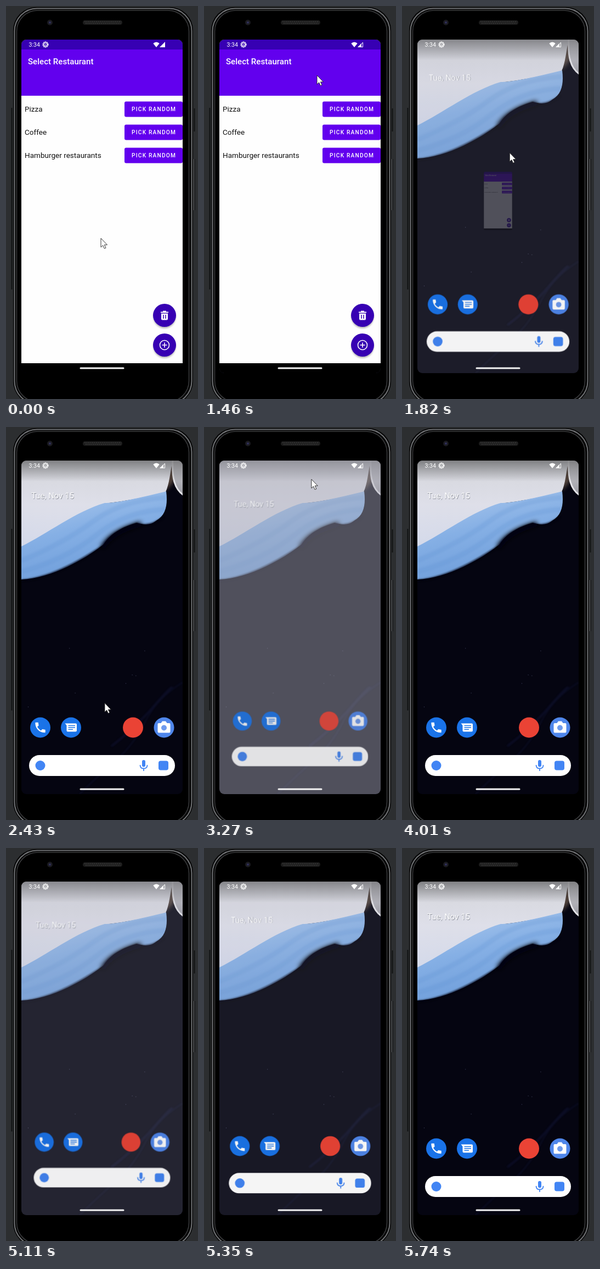
Animation, 350 px wide and 714 px high, one loop 8 s. Source, as an HTML page:

```html
<!DOCTYPE html>
<html lang="en">
<head>
<meta charset="utf-8">
<title>Phone home gesture</title>
<style>
  html, body { margin: 0; width: 100%; height: 100%; overflow: hidden; background: #2c2e30; }
  svg { display: block; width: 350px; height: 714px; font-family: Roboto, sans-serif; }
</style>
</head>
<body>
<svg viewBox="0 0 350 714" xmlns="http://www.w3.org/2000/svg">
  <defs>
    <clipPath id="screen"><rect x="28" y="61" width="294" height="606" rx="9"/></clipPath>
    <clipPath id="blue"><path d="M28 217C75 194 128 153 180 138C205 138 250 127 292 117C295 140 292 160 274 170C262 180 250 177 238 174C212 182 192 192 178 213C150 236 85 275 28 277Z"/></clipPath>
    <linearGradient id="sky" x2="0" y2="1"><stop stop-color="#d4d5da"/><stop offset=".5" stop-color="#dedfe9"/><stop offset="1" stop-color="#d3d9ea"/></linearGradient>
    <linearGradient id="wave" x2=".35" y2="1"><stop stop-color="#b3cdee"/><stop offset=".5" stop-color="#86b0e5"/><stop offset="1" stop-color="#6c9cda"/></linearGradient>
    <linearGradient id="ring" x2="0" y2="1"><stop stop-color="#d6d6da"/><stop offset="1" stop-color="#9a9aa2"/></linearGradient>
    <linearGradient id="shade" x2="0" y2="1"><stop stop-color="#000" stop-opacity=".4"/><stop offset="1" stop-color="#000" stop-opacity="0"/></linearGradient>
    <filter id="soft" x="-30%" y="-30%" width="160%" height="160%"><feGaussianBlur stdDeviation="4"/></filter>
    <filter id="fuzz" x="-30%" y="-30%" width="160%" height="160%"><feGaussianBlur stdDeviation="1.5"/></filter>
  </defs>

  <!-- phone body -->
  <rect width="350" height="714" fill="#2c2e30"/>
  <path d="M10.500 185V515M343.500 186V228M343.500 278V371" stroke="#111213" stroke-width="2" fill="none"/>
  <path d="M342.500 278V371" stroke="#6a6c6f" fill="none"/>
  <rect x="13" y="2" width="328" height="722" rx="42" fill="#050505"/>
  <rect x="15.500" y="4.500" width="323" height="718" rx="41" fill="none" stroke="#717376" stroke-width="2"/>
  <rect x="19.500" y="8" width="314" height="711" rx="38" fill="#000" stroke="#3a3b3d" stroke-width="1.500"/>
  <circle cx="80" cy="30" r="5" fill="#1b1b20"/><circle cx="80" cy="30" r="2" fill="#30305a"/>
  <rect x="140" y="26" width="72" height="8" rx="4" fill="#1c1c1c"/>
  <path d="M143 28.500H210M145 31.500H209" stroke="#3b3b3b" stroke-width="1.600" stroke-dasharray="2 1.500"/>

  <g clip-path="url(#screen)">
    <rect x="28" y="61" width="294" height="606" fill="#050511"/>
    <path d="M284 118L294 88L300 55H312V90L298 108Z" fill="#7d6655" filter="url(#soft)" opacity=".7"/>
    <path d="M28 61H304C299 83 298 103 291 118C255 127 220 135 180 139C130 153 75 194 28 222Z" fill="url(#sky)"/>
    <g clip-path="url(#blue)">
      <rect x="28" y="110" width="270" height="175" fill="url(#wave)"/>
      <g fill="none" stroke="#5d8fd0" stroke-width="9" opacity=".2" filter="url(#fuzz)">
        <path d="M28 243Q105 211 158 172T292 128"/>
        <path d="M28 263Q110 240 165 196T290 150"/>
      </g>
    </g>
    <path d="M28 279Q92 274 178 215Q192 190 238 176Q262 184 288 163" stroke="#050511" stroke-width="4" fill="none" filter="url(#fuzz)" opacity=".75"/>
    <path d="M176 220Q190 192 246 176" stroke="#050511" stroke-width="9" fill="none" filter="url(#soft)"/>
    <path d="M304 58C302 92 307 113 324 124V58Z" fill="url(#ring)"/>
    <path d="M304 58C302 92 307 113 324 124" stroke="#e4e4e8" stroke-width="3" fill="none"/>
    <g fill="none" stroke="#141d50" opacity=".32" filter="url(#fuzz)">
      <path d="M134 667Q172 630 202 604T254 535T322 464" stroke-width="2"/>
      <path d="M192 580Q232 550 269 508T302 475" stroke-width="4"/>
    </g>
    <g id="stars" fill="#4d506d"></g>
    <rect x="28" y="61" width="294" height="38" fill="url(#shade)"/>
    <rect id="scrim" x="28" y="61" width="294" height="606" fill="#acacb9"/>

    <g id="home">
      <text x="46.600" y="130.700" font-size="15" fill="#555a68" opacity=".65">Tue, Nov 15</text>
      <text x="46" y="130" font-size="15" fill="#fff">Tue, Nov 15</text>
      <g fill="#1a73e8"><circle cx="62.500" cy="546" r="18.500"/><circle cx="118.500" cy="546" r="18.500"/></g>
      <path transform="translate(50.300 533.800) scale(1.020)" fill="#fff" d="M6.600 10.800c1.400 2.800 3.800 5.100 6.600 6.600l2.200-2.200c.3-.3.700-.4 1-.2 1.100.4 2.300.6 3.600.6.600 0 1 .4 1 1V20c0 .600-.4 1-1 1C10.600 21 3 13.400 3 4c0-.6.4-1 1-1h3.500c.6 0 1 .4 1 1 0 1.300.2 2.500.6 3.600.1.300 0 .700-.2 1z"/>
      <path d="M107.500 538.500H127Q129 538.500 129 540.500V551.500Q129 553.500 127 553.500H112.500Q110.500 553.500 110.500 551.500V542Z" fill="#fff"/>
      <path d="M113.500 542.500H126M113.500 546H126M113.500 549.500H122" stroke="#1a73e8" stroke-width="1.400"/>
      <circle cx="231.500" cy="546" r="18.500" fill="#ea4335"/>
      <circle cx="288" cy="546" r="18.500" fill="#4f86ea"/>
      <path d="M278.500 538H282.500L285 534.500H291L293.500 538H297.500Q299.500 538 299.500 540V553Q299.500 555.500 297.500 555.500H278.500Q276.500 555.500 276.500 553V540Q276.500 538 278.500 538Z" fill="#fff"/>
      <circle cx="288" cy="546.500" r="5" fill="#6f9bee"/>
      <rect x="42" y="596" width="266" height="38" rx="19" fill="#fff"/>
      <circle cx="62.500" cy="615" r="9" fill="#4285f4"/>
      <rect x="248" y="605" width="6" height="12.500" rx="3" fill="#4285f4"/>
      <path d="M244.500 614Q244.500 620.500 251 620.500T257.500 614M251 620.500V625" fill="none" stroke="#4285f4" stroke-width="1.800"/>
      <rect x="278" y="606.500" width="18" height="17" rx="4" fill="#4285f4"/>
    </g>

    <g id="app">
      <rect x="28" y="61" width="294" height="606" rx="9" fill="#000"/>
      <path d="M28 79V70Q28 61 37 61H313Q322 61 322 70V79Z" fill="#3700b3"/>
      <rect x="28" y="79" width="294" height="84" fill="#6200ee"/>
      <rect x="28" y="163" width="294" height="486" fill="#fefefe"/>
      <text x="40" y="106" font-size="15.100" font-weight="500" fill="#fff">Select Restaurant</text>
      <g id="rows"></g>
      <g fill="#000" opacity=".28" filter="url(#fuzz)"><circle cx="289" cy="565" r="20.500"/><circle cx="289" cy="619" r="20.500"/></g>
      <g fill="#3700b3"><circle cx="289" cy="562" r="21"/><circle cx="289" cy="616" r="21"/></g>
      <path d="M282 555.500H296V557.500H282ZM286 553.800H292V556H286ZM283 558.800H295V568.500Q295 570.500 293 570.500H285Q283 570.500 283 568.500Z" fill="#fff"/>
      <path d="M287 561V568M291 561V568" stroke="#3700b3" stroke-width="1.500"/>
      <g fill="none" stroke="#fff" stroke-width="1.600"><circle cx="289" cy="616" r="8.500"/><path d="M289 611.500V620.500M284.500 616H293.500"/></g>
    </g>

    <!-- status bar -->
    <text x="41.500" y="74" font-size="10.600" fill="#fff">3:34</text>
    <g fill="none" stroke="#fff">
      <circle cx="72" cy="70" r="4.700" stroke-width="1.600" stroke-dasharray="2.200 .75"/>
      <circle cx="72" cy="70" r="3.500"/>
      <path d="M69 69H75M69 71.500H75" stroke-width=".8"/>
    </g>
    <path d="M268.300 68Q274 63 279.700 68L274 75Z" fill="#fff"/>
    <path id="full" d="M290 65V75H280Z" fill="#fff"/>
    <g id="weak"><path d="M289.500 66.200V74.500H281.200Z" fill="none" stroke="#fff"/><path d="M287 68V75H280Z" fill="#fff"/></g>
  </g>
  <rect x="134.500" y="656.500" width="81" height="3" rx="1.500" fill="#f4f4f4"/>
  <path id="cursor" d="M0 0V16.200L3.700 12.900L6.300 18.700L9 17.500L6.400 11.900H11.500Z" fill="#fff" stroke="#222" stroke-width=".9"/>
</svg>
<script>
const LOOP = 8000;
const $ = id => document.getElementById(id);
const clamp = v => Math.min(1, Math.max(0, v));
const easeOut = p => 1 - (1 - p) ** 2;

$("rows").innerHTML = ["Pizza", "Coffee", "Hamburger restaurants"].map((name, i) => {
  const y = 187 + i * 42;
  return `<text x="34" y="${y + 5}" font-size="13.550" fill="#111">${name}</text>
    <rect x="216" y="${y - 13.5}" width="106" height="28" rx="3" fill="#6200ee"/>
    <text x="229" y="${y + 4}" font-size="10.200" font-weight="500" letter-spacing="1.200" fill="#fff">PICK RANDOM</text>`;
}).join("");

let seed = 7;
const random = () => (seed = seed * 16807 % 2147483647) / 2147483647;
$("stars").innerHTML = Array.from({ length: 7 }, () =>
  `<rect x="${40 + random() * 260}" y="${370 + random() * 150}" width="1" height="1"/>`).join("");

// the picture refreshes in runs: first time, last time, number of steps
const runs = [
  [0, 120, 2], [270, 390, 2], [540, 690, 2], [970, 970, 1], [1220, 2060, 8],
  [2180, 3750, 14], [3890, 4970, 10], [5110, 5470, 4], [5620, 5740, 2]
];
const ticks = runs.flatMap(([a, b, n]) =>
  Array.from({ length: n }, (_, i) => a + (b - a) * i / Math.max(1, n - 1)));

// cursor path: time, x, y
const path = [
  [0, 173, 422], [120, 174, 502], [390, 206, 652], [690, 218, 664], [1220, 218, 664],
  [1460, 206, 126], [2420, 180, 501], [2910, 176, 669], [3270, 196, 90],
  [4610, 180, 683], [4970, 205, 16]
];

// each swipe pulls the home screen back, then lets it settle
const swipes = [
  { start: 1340, end: 2180, zoom: .1, dim: .3, fade: 1 },
  { start: 2910, end: 4010, zoom: .07, dim: .45, fade: 3 },
  { start: 4730, end: 5740, zoom: .096, dim: .232, fade: 1 }
];

function cursorAt(t) {
  const i = path.findIndex(k => k[0] > t);
  const [t0, x0, y0] = path.at(i < 0 ? -1 : i - 1);
  if (i < 0) return [x0, y0];
  const [t1, x1, y1] = path[i], p = (t - t0) / (t1 - t0);
  return [x0 + (x1 - x0) * p, y0 + (y1 - y0) * p];
}

const show = (id, on) => $(id).style.display = on ? "" : "none";

function place(id, y, scale, opacity) {
  $(id).setAttribute("transform", `translate(175 ${y}) scale(${scale}) translate(-175 -364)`);
  $(id).setAttribute("opacity", opacity);
}

function draw(t) {
  let scale = 1, scrim = 0;
  for (const { start, end, zoom, dim, fade } of swipes) {
    const pull = clamp(Math.min((t - start) / 240, (end - t) / 770));
    scale -= zoom * pull ** 2;
    scrim += dim * clamp(pull * fade);
  }
  place("home", 364, scale, 1 - scrim * .36);
  $("scrim").setAttribute("opacity", scrim);

  const closing = easeOut(clamp((t - 1460) / 480));
  place("app", 364 - 50 * Math.sin(Math.PI * closing), 1 - .88 * closing, 1 - closing ** 4);
  show("app", closing < 1);

  show("full", t < 970);
  show("weak", t >= 970);

  $("cursor").setAttribute("transform", `translate(${cursorAt(t)})`);
  show("cursor", t < 3750 || (t > 4100 && t < 5110));
}

let last = -1;
function loop(now) {
  const t = now % LOOP;
  const tick = ticks.filter(k => k <= t).pop();
  if (tick !== last) draw(last = tick);
  requestAnimationFrame(loop);
}
draw(0);
requestAnimationFrame(loop);
</script>
</body>
</html>
```
